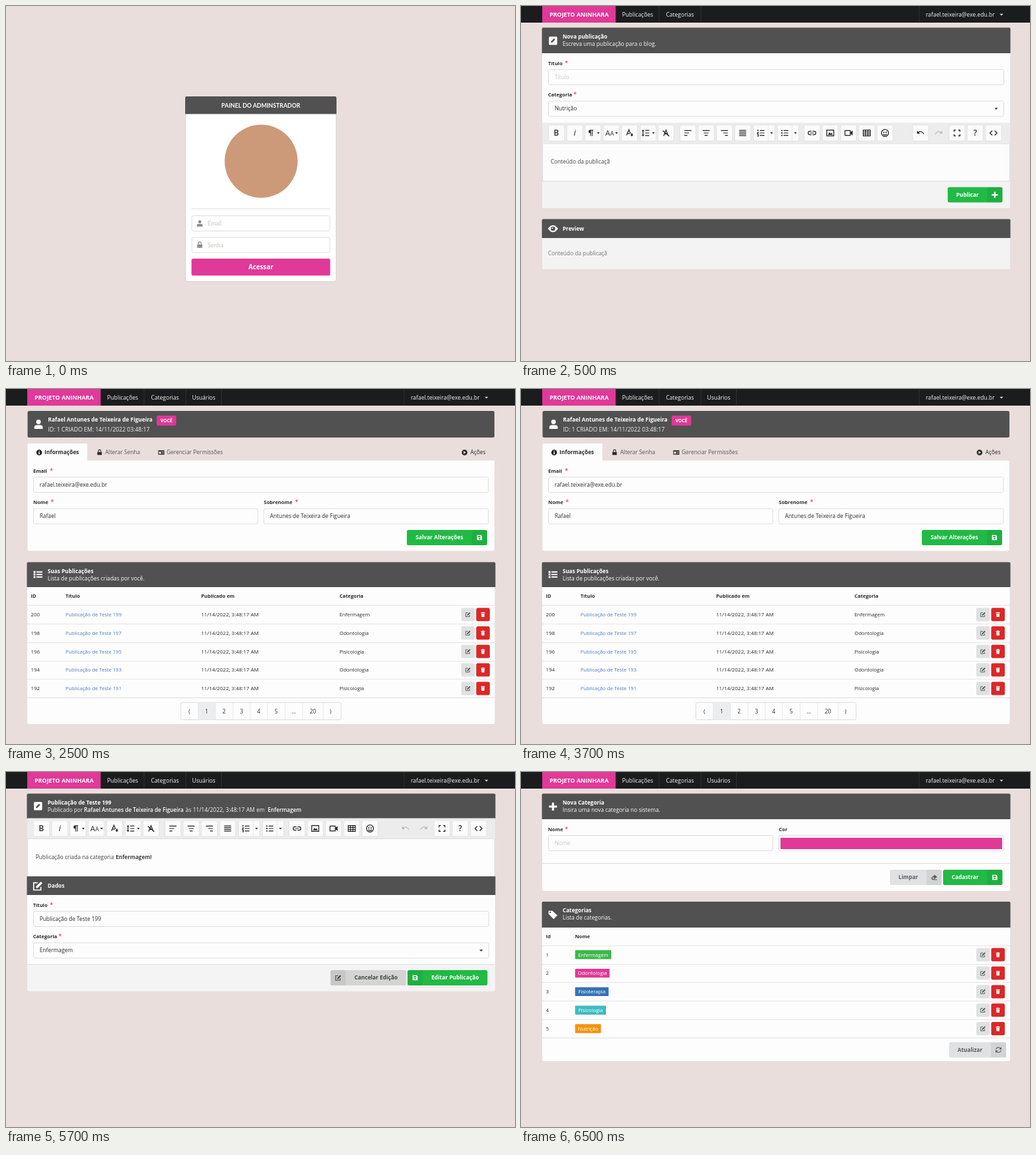
These frames come from a looping animation (767x534 px, 8000 ms). An HTML page:

```html
<!DOCTYPE html>
<html lang="pt-BR">
<head>
<meta charset="utf-8">
<title>Painel</title>
<style>
html, body { margin: 0; width: 100%; height: 100%; overflow: hidden; background: #e9dedc; }
svg { display: block; width: 767px; height: 534px; }
text { font-family: "Open Sans", sans-serif; white-space: pre; }
.lato { font-family: Lato, sans-serif; }
</style>
</head>
<body>
<svg id="stage" viewBox="0 0 767 534"></svg>
<script>
const PINK = '#e03997', GREEN = '#21ba45', RED = '#db2828', DARK = '#515151',
  INK = '#2c2c2c', LINE = '#dededf', GREY = '#e0e1e2', PAPER = '#fdfdfd';
const EMAIL = 'rafael.teixeira@exe.edu.br';
const FIRST = 'Rafael', LAST = 'Antunes de Teixeira de Figueira';

// Basic shapes; text is placed by the middle of its capitals.
const rect = (x, y, w, h, fill, r = 0, stroke = 'none') =>
  `<rect x="${x}" y="${y}" width="${w}" height="${h}" fill="${fill}" rx="${r}" stroke="${stroke}"/>`;
const box = (x, y, w, h, fill = PAPER, r = 2.5, stroke = LINE) => rect(x + .5, y + .5, w - 1, h - 1, fill, r, stroke);
const text = (x, y, s, { size = 8.35, color = INK, weight = 400, anchor = 'start', cls = '' } = {}) =>
  `<text x="${x}" y="${y + size * .357}" font-size="${size}" fill="${color}" font-weight="${weight}" text-anchor="${anchor}" class="${cls}">${s}</text>`;
const bold = (x, y, s, o = {}) => text(x, y, s, { size: 8.2, weight: 700, ...o });
const line = (x1, y1, x2, y2, color = LINE) => `<path d="M${x1} ${y1}L${x2} ${y2}" stroke="${color}"/>`;
const topRound = (x, y, w, h, fill = DARK) =>
  `<path d="M${x} ${y + h}v${2 - h}q0-2 2-2h${w - 4}q2 0 2 2v${h - 2}z" fill="${fill}"/>`;

// Icons centred on the origin: filled path, then stroked path.
const ICONS = {
  user: ['M-3-3a3 3 0 0 1 6 0a3 3 0 0 1-6 0M-5.5 6V4q0-3 3.5-3h4q3.5 0 3.5 3v2z'],
  lock: ['M-4.5-1h9v6h-9z', 'M-2.5-1v-2a2.5 2.5 0 0 1 5 0v2'],
  pencil: ['M-5 5v-3L2.5-5.5 5.5-2.5-2 5z'],
  edit: ['M-2 2.5v-2L4-5.5 6-3.5 0 2.5z', 'M0-4h-5v9h9v-4'],
  trash: ['M-5-5h3l1-1h2l1 1h3v1.6h-10zM-4-2.5h8l-.6 8.5h-6.8z'],
  save: ['M-5-5h8l2 2v8h-10zM-3-3.4v2.6h5v-2.6zM-1.7 2a1.7 1.7 0 0 0 3.4 0a1.7 1.7 0 0 0-3.4 0'],
  plus: ['M-1.5-6h3v4.5h4.5v3h-4.5v4.5h-3v-4.5h-4.5v-3h4.5z'],
  eye: ['M-8 0Q0-11 8 0Q0 11-8 0M-3.5 0a3.5 3.5 0 0 0 7 0a3.5 3.5 0 0 0-7 0M-2 0a2 2 0 0 1 2-2v2z'],
  info: ['M-6 0a6 6 0 0 1 12 0a6 6 0 0 1-12 0M-1-3.6v2h2v-2zM-1.5-.6v1h.5v2h-.5v1.2h3v-1.2h-.5v-3z'],
  play: ['M-6 0a6 6 0 0 1 12 0a6 6 0 0 1-12 0M-2-3v6l5-3z'],
  card: ['M-7-5h14v10h-14zM-5.5-2v5h5v-5zM1-2v1.2h4.5v-1.2zM1 1v1.2h4.5v-1.2z'],
  list: ['M-7-5.5h3v3h-3zM-7-1.5h3v3h-3zM-7 2.5h3v3h-3zM-2.5-5h9.5v2h-9.5zM-2.5-1h9.5v2h-9.5zM-2.5 3h9.5v2h-9.5z'],
  tag: ['M-7-6h6l8 7-6 6-8-8zM-5.5-3.5a1.2 1.2 0 0 0 2.4 0a1.2 1.2 0 0 0-2.4 0'],
  eraser: ['M-6 1 1-5 6-1-1 5h-3zM-4 1.2l2.5 2.2 2-1.8-2.6-2.2zM0 4h6v1.2h-6z'],
  sync: ['M6-6v5h-5zM-6 6v-5h5z', 'M4.5-2A5 5 0 0 0-5-1M-4.5 2A5 5 0 0 0 5 1'],
  caret: ['M-3-1.5h6L0 1.7z'],
  pilcrow: ['M-1.5-5.5h6v1.2h-1.3v9.3h-1.2v-9.3h-1.5v9.3h-1.2v-4.7a2.9 2.9 0 0 1 0-5.8'],
  drop: ['M4 0q2.6 3 1.8 4.4a2.1 2.1 0 0 1-3.6 0q-.8-1.4 1.8-4.4', 'M-5 4-1-5.5 1.8 1M-3.5 1h4'],
  leading: ['M-7-3l2.3-3 2.3 3zM-7 3l2.3 3 2.3-3z', 'M-4.7-4v8M-1-4.5h7M-1 0h7M-1 4.5h7'],
  clear: ['', 'M-4 5 0-5 4 5M-2.6 1.5h5.2M-5.5-4 5.5 5.5'],
  left: ['', 'M-6-4h12M-6 0h8M-6 4h5'],
  center: ['', 'M-6-4h12M-4 0h8M-2.5 4h5'],
  right: ['', 'M-6-4h12M-2 0h8M1 4h5'],
  justify: ['', 'M-6-4.5h12M-6-1.5h12M-6 1.5h12M-6 4.5h12'],
  ordered: ['', 'M-2-4h8M-2 0h8M-2 4h8M-6-5h1v2M-6-1h1.5l-1.5 2h2M-6 3h1.5v2.5h-1.5'],
  bullets: ['M-6-5h2v2h-2zM-6-1h2v2h-2zM-6 3h2v2h-2z', 'M-2-4h8M-2 0h8M-2 4h8'],
  link: ['', 'M-1-3h-2.5a3 3 0 0 0 0 6h2.5M1-3h2.5a3 3 0 0 1 0 6h-2.5M-3 0h6'],
  image: ['M-4 3l2.5-4 2 2.2 1.5-1.7 2.3 3.5z', 'M-6-5h12v10h-12z'],
  video: ['M3-1l4-3v8l-4-3z', 'M-6-4h9v8h-9z'],
  table: ['', 'M-6-5h12v10h-12zM-6-1.7h12M-6 1.7h12M-2-5v10M2-5v10'],
  smile: ['M-3-2h2v2h-2zM1-2h2v2h-2z', 'M-6 0a6 6 0 0 1 12 0a6 6 0 0 1-12 0M-3 2q3 3 6 0'],
  undo: ['M-6-4v5h5z', 'M-4-1q5-4 10 3'],
  redo: ['M6-4v5h-5z', 'M4-1q-5-4-10 3'],
  full: ['', 'M-5-2v-3h3M2-5h3v3M5 2v3h-3M-2 5h-3v-3'],
  code: ['', 'M-2-4-6 0-2 4M2-4 6 0 2 4']
};
function icon(name, x, y, color = INK, scale = .75) {
  const [fill, stroke] = ICONS[name];
  return `<g transform="translate(${x} ${y}) scale(${scale})">` +
    (fill ? `<path d="${fill}" fill="${color}" fill-rule="evenodd"/>` : '') +
    (stroke ? `<path d="${stroke}" fill="none" stroke="${color}" stroke-width="1.4"/>` : '') + '</g>';
}

// Interface parts.
function nav(full) {
  const edges = [143, 208, 271, ...(full ? [324.5] : []), 600];
  const light = { size: 8.5, color: '#f6f6f6' };
  return rect(0, 0, 767, 25, '#1b1c1d') + rect(32, 0, 111, 25, PINK) +
    edges.map(x => line(x, 0, x, 25, '#303132')).join('') +
    bold(87.5, 13, 'PROJETO ANINHARA', { size: 8.9, color: '#fff', anchor: 'middle' }) +
    text(152.5, 13, 'Publicações', light) + text(218.5, 13, 'Categorias', light) +
    (full ? text(280.5, 13, 'Usuários', light) : '') +
    text(610, 13, EMAIL, light) + icon('caret', 724, 13, light.color, .85);
}
const heading = (y, h, title, sub) => topRound(31.5, y, 706, h) +
  bold(62.7, y + 13.3, title, { color: '#fff' }) + (sub ? text(62.7, y + 24.3, sub, { color: '#fafafa' }) : '');
const penBadge = y => rect(42, y - 6, 12.5, 12.5, '#fff', 1.5) + icon('pencil', 48.2, y, DARK, .6);
function label(x, y, s, star) {
  return bold(x, y, s, { size: 7.55 }) + (star ? text(star, y - .5, '*', { size: 9, color: RED }) : '');
}
const field = (x, y, w, s, color = INK, h = 24) => box(x, y, w, h) + text(x + 9.7, y + h / 2, s, { color });
const select = (y, s) => field(41, y, 687, s) + icon('caret', 716, y + 12, INK, .85);
function button(x, y, w, s, name, { fill = GREEN, color = '#fff', side = 'right', h = 23 } = {}) {
  const ix = side === 'right' ? x + w - 23 : x;
  const mid = side === 'right' ? x + (w - 23) / 2 : x + 23 + (w - 23) / 2;
  return rect(x, y, w, h, fill, 2.5) + rect(ix, y, 23, h, 'rgba(0,0,0,.06)', 2.5) +
    bold(mid, y + h / 2, s, { size: 8.3, color, anchor: 'middle' }) + icon(name, ix + 11.5, y + h / 2, color, .75);
}
const rowButtons = y => rect(686, y - 10, 20.5, 20, GREY, 2.5) + icon('edit', 696, y, '#555', .65) +
  rect(708.5, y - 10, 20.5, 20, RED, 2.5) + icon('trash', 718.7, y, '#fff', .62);

function toolbar(y, canUndo) {
  const c = y + 15.5;
  const tools = [[81, ''], [108.5, 'pilcrow', 1], [136, '', 1], [163.5, 'drop'], [191.5, 'leading', 1], [218.5, 'clear'],
    [251.5, 'left'], [279, 'center'], [306.5, 'right'], [334, 'justify'], [438.5, 'link'], [466, 'image'],
    [493.5, 'video'], [521, 'table'], [548.5, 'smile'], [602, 'undo'], [629.5, 'redo'], [657, 'full'], [684.5, ''], [712, 'code']];
  const frame = (x, w) => box(x - w / 2, c - 12.5, w, 25, '#fbfbfb', 2, '#e4e4e4');
  let out = rect(32, y, 705, 31, '#ececec') + frame(53.5, 25);
  for (const [x, name, drop] of tools) {
    const off = name === 'redo' || (name === 'undo' && !canUndo);
    if (!off) out += frame(x, 25);
    if (name) out += icon(name, x - (drop ? 3.5 : 0), c, off ? '#b8b8b8' : '#222', .88);
    if (drop) out += icon('caret', x + 8, c, '#222', .75);
  }
  for (const [x, name] of [[366.5, 'ordered'], [402.5, 'bullets']]) {
    out += frame(x, 33) + line(x + 6, c - 12, x + 6, c + 12, '#e8e8e8') +
      icon(name, x - 5, c, '#222', .88) + icon('caret', x + 11, c, '#222', .75);
  }
  return out + bold(53.3, c, 'B', { size: 12, anchor: 'middle', weight: 600 }) +
    `<text x="81" y="${c + 4.3}" font-size="12" font-style="italic" text-anchor="middle" fill="#222">i</text>` +
    text(127, c, 'A', { size: 11.5 }) + text(134.5, c + 1.2, 'A', { size: 8.5 }) +
    text(684.5, c, '?', { size: 12, anchor: 'middle', weight: 600 });
}

function login() {
  const lato = { cls: 'lato', color: '#c9c2c1', size: 8.7 };
  return box(270, 136, 228, 279, '#fff', 2.5, '#d8d3d2') + topRound(270, 136, 228, 26.5) +
    bold(384, 149.5, 'PAINEL DO ADMINSTRADOR', { cls: 'lato', color: '#fff', size: 8.75, anchor: 'middle' }) +
    '<circle cx="384.5" cy="233.5" r="55" fill="#cc9a78"/>' +
    line(279.5, 305, 488.5, 305) +
    box(279.5, 315, 209, 24, '#fff') + icon('user', 292, 327, '#8c8c8c', .8) + text(304, 327, 'Email', lato) +
    box(279.5, 347.5, 209, 24, '#fff') + icon('lock', 292, 359.5, '#8c8c8c', .85) + text(304, 359.5, 'Senha', lato) +
    rect(279.5, 380, 209, 25.5, PINK, 2.5) +
    bold(384, 393, 'Acessar', { size: 9.8, color: '#fff', anchor: 'middle' });
}

function newPost() {
  const draft = 'Conteúdo da publicaçã';
  return nav(false) + rect(32, 40, 705, 264, PAPER, 2.5) +
    heading(32.5, 38.5, 'Nova publicação', 'Escreva uma publicação para o blog.') + penBadge(52) +
    label(40.7, 86, 'Título', 66) + field(41, 95, 687, 'Título', '#c8c8c8') +
    label(40.7, 133, 'Categoria', 79) + select(142.5, 'Nutrição') +
    toolbar(175.5, true) + box(32, 206.5, 705, 57.5, '#fcfcfc', 0) + text(44.7, 234.5, draft, { color: '#444' }) +
    rect(32, 264, 705, 40, '#f3f3f3', 2.5) + button(643, 272.5, 82.5, 'Publicar', 'plus') +
    rect(32, 330, 705, 66, '#f3f3f3', 2.5) + topRound(31.5, 320.5, 706, 28.5) +
    icon('eye', 48.2, 335, '#fff', .95) + bold(62.7, 335, 'Preview', { color: '#fff' }) +
    text(40.7, 372, draft, { color: '#777' });
}

function profile() {
  const cats = ['Enfermagem', 'Odontologia', 'Pisicologia', 'Odontologia', 'Pisicologia'];
  const cell = { size: 7.6 }, head = { size: 7.5 };
  let out = nav(true) + rect(32.5, 33, 703.5, 40, DARK, 2.5) + icon('user', 49, 53, '#fff', 1.15) +
    bold(63.3, 46.5, `${FIRST} ${LAST}`, { size: 8.3, color: '#fff' }) +
    rect(227, 40, 29.5, 15, PINK, 2) + bold(241.7, 47.5, 'VOCÊ', { size: 6.8, color: '#fff', anchor: 'middle' }) +
    text(63.3, 60.5, 'ID: 1 CRIADO EM: 14/11/2022 03:48:17', { size: 8.6, color: '#f0f0f0' }) +
    rect(32.5, 107.5, 703.5, 136, PAPER, 2) + topRound(32.5, 82, 90, 27, PAPER) +
    icon('info', 50, 95.5, '#222', .72) + bold(58, 95.5, 'Informações', { size: 8.3 }) +
    icon('lock', 141, 95.5, INK, .75) + text(149.5, 95.5, 'Alterar Senha', { color: '#555' }) +
    icon('card', 234, 95.5, INK, .65) + text(242, 95.5, 'Gerenciar Permissões', { color: '#555' }) +
    icon('play', 691, 95.5, INK, .72) + text(699.7, 95.5, 'Ações') +
    label(41, 123, 'Email', 66) + field(41, 132, 686.5, EMAIL) +
    label(41, 170.5, 'Nome', 67) + field(41, 179.5, 339, FIRST) +
    label(388.5, 170.5, 'Sobrenome', 435.5) + field(388, 179.5, 339.5, LAST) +
    button(604, 212, 121, 'Salvar Alterações', 'save') +
    rect(32, 270, 704.5, 234, PAPER, 2.5) +
    heading(260.5, 37.5, 'Suas Publicações', 'Lista de publicações criadas por você.') + icon('list', 48.2, 279, '#fff', .95) +
    bold(37.5, 311.5, 'ID', head) + bold(89.7, 311.5, 'Título', head) +
    bold(294, 311.5, 'Publicado em', head) + bold(502.5, 311.5, 'Categoria', head);
  cats.forEach((cat, i) => {
    const y = 339.2 + i * 27.8, n = 200 - 2 * i;
    out += line(32, Math.round(y - 14) + .5, 736.5, Math.round(y - 14) + .5, '#e6e6e7') +
      text(37.5, y, n, { size: 7.8 }) +
      text(89.7, y, `Publicação de Teste ${n - 1}`, { size: 7.6, color: '#4a7ec0' }) +
      text(294, y, '11/14/2022, 3:48:17 AM', { size: 7.9 }) + text(502.5, y, cat, cell) + rowButtons(y);
  });
  out += line(32, 464.5, 736.5, 464.5) + box(263, 471, 242.5, 27) + rect(289.5, 471.5, 26, 26, '#ebedef');
  const stops = [263, 289.5, 315.5, 342, 368, 394, 420.5, 447, 478, 505];
  ['⟨', 1, 2, 3, 4, 5, '...', 20, '⟩'].forEach((s, i) => {
    const x = (stops[i] + stops[i + 1]) / 2 - (i > 7 ? 2 : 0);
    if (i) out += line(stops[i], 472, stops[i], 497, '#e8e8e9');
    out += text(x, 485, s, { anchor: 'middle' });
  });
  return out;
}

function editPost() {
  const white = { color: '#fff' };
  return nav(true) + rect(32, 40, 705, 289.5, PAPER, 2.5) +
    heading(32.5, 37.5, 'Publicação de Teste 199') + penBadge(51) +
    text(62.7, 57, 'Publicado por', { size: 8.2, color: '#f0f0f0' }) +
    text(117.5, 57, `${FIRST} ${LAST}`, { size: 8.2, weight: 600, ...white }) +
    text(270.5, 57, 'às 11/14/2022, 3:48:17 AM em', { size: 8.5, color: '#f0f0f0' }) +
    text(394.5, 57, 'Enfermagem', { size: 8.2, weight: 600, ...white }) +
    toolbar(69.5, false) + box(32, 100, 705, 57.5, PAPER, 0) +
    text(44.7, 128.5, 'Publicação criada na categoria', { color: '#444' }) + bold(165.2, 128.5, 'Enfermagem!', { color: '#444' }) +
    rect(31.5, 157, 706, 28, DARK) + icon('edit', 47.7, 171.5, '#fff', 1.2) + bold(62.7, 171.5, 'Dados', white) +
    label(40.7, 200, 'Título', 66) + field(41, 209, 687, 'Publicação de Teste 199') +
    label(40.7, 247, 'Categoria', 79) + select(256.5, 'Enfermagem') +
    rect(32, 289.5, 705, 40, '#f3f4f3', 2.5) + line(32, 289.5, 737, 289.5) +
    button(489, 298, 114, 'Cancelar Edição', 'edit', { fill: '#d4d4d5', color: '#444', side: 'left' }) +
    button(605, 298, 120.5, 'Editar Publicação', 'save', { side: 'left' });
}

function categories() {
  const list = [['Enfermagem', '#3cb84a', 54.5], ['Odontologia', PINK, 52], ['Fisioterapia', '#3573b5', 50.5],
    ['Pisicologia', '#3dbcc0', 46.5], ['Nutrição', '#f2950d', 39]];
  const grey = { fill: GREY, color: '#5c5c5c' };
  let out = nav(true) + rect(32, 40, 705, 139, PAPER, 2.5) +
    heading(32.5, 38.5, 'Nova Categoria', 'Insira uma nova categoria no sistema.') + icon('plus', 48.2, 52, '#fff', 1) +
    label(40.7, 86, 'Nome', 66) + field(41, 95, 339, 'Nome', '#c8c8c8') +
    label(388.5, 86, 'Cor') + box(388, 95, 340, 24) + rect(391, 99, 334, 17, PINK) +
    line(32, 137.5, 737, 137.5) +
    button(556, 147, 78, 'Limpar', 'eraser', grey) + button(636, 147, 89.5, 'Cadastrar', 'save') +
    rect(32, 205, 705, 230, PAPER, 2.5) +
    heading(195, 39, 'Categorias', 'Lista de categorias.') + icon('tag', 48.2, 214.5, '#fff', .95) +
    bold(37.5, 247, 'Id', { size: 7.5 }) + bold(81.5, 247, 'Nome', { size: 7.5 });
  list.forEach(([name, color, w], i) => {
    const y = 274.8 + i * 27.8;
    out += line(32, Math.round(y - 14) + .5, 737, Math.round(y - 14) + .5, '#e6e6e7') +
      text(37.5, y, i + 1, { size: 7.8 }) + rect(81.5, y - 6.7, w, 13.4, color, 1) +
      text(81.5 + w / 2, y, name, { size: 7.6, color: '#fff', anchor: 'middle' }) + rowButtons(y);
  });
  return out + line(32, 400, 737, 400) + button(645, 406.5, 86, 'Atualizar', 'sync', grey);
}

const LOOP = 8000;
const scenes = [[0, login], [500, newPost], [2500, profile], [4500, editPost], [6500, categories]];
const stage = document.getElementById('stage');
stage.innerHTML = scenes.map(([, draw]) => `<g display="none">${draw()}</g>`).join('');
const groups = [...stage.children];
const start = performance.now();

function show(time) {
  const now = Math.max(0, time - start) % LOOP;
  const current = scenes.filter(([from]) => from <= now).length - 1;
  groups.forEach((g, i) => g.setAttribute('display', i === current ? 'inline' : 'none'));
}
function tick(time) {
  show(time);
  requestAnimationFrame(tick);
}
show(start);
requestAnimationFrame(tick);
</script>
</body>
</html>
```
